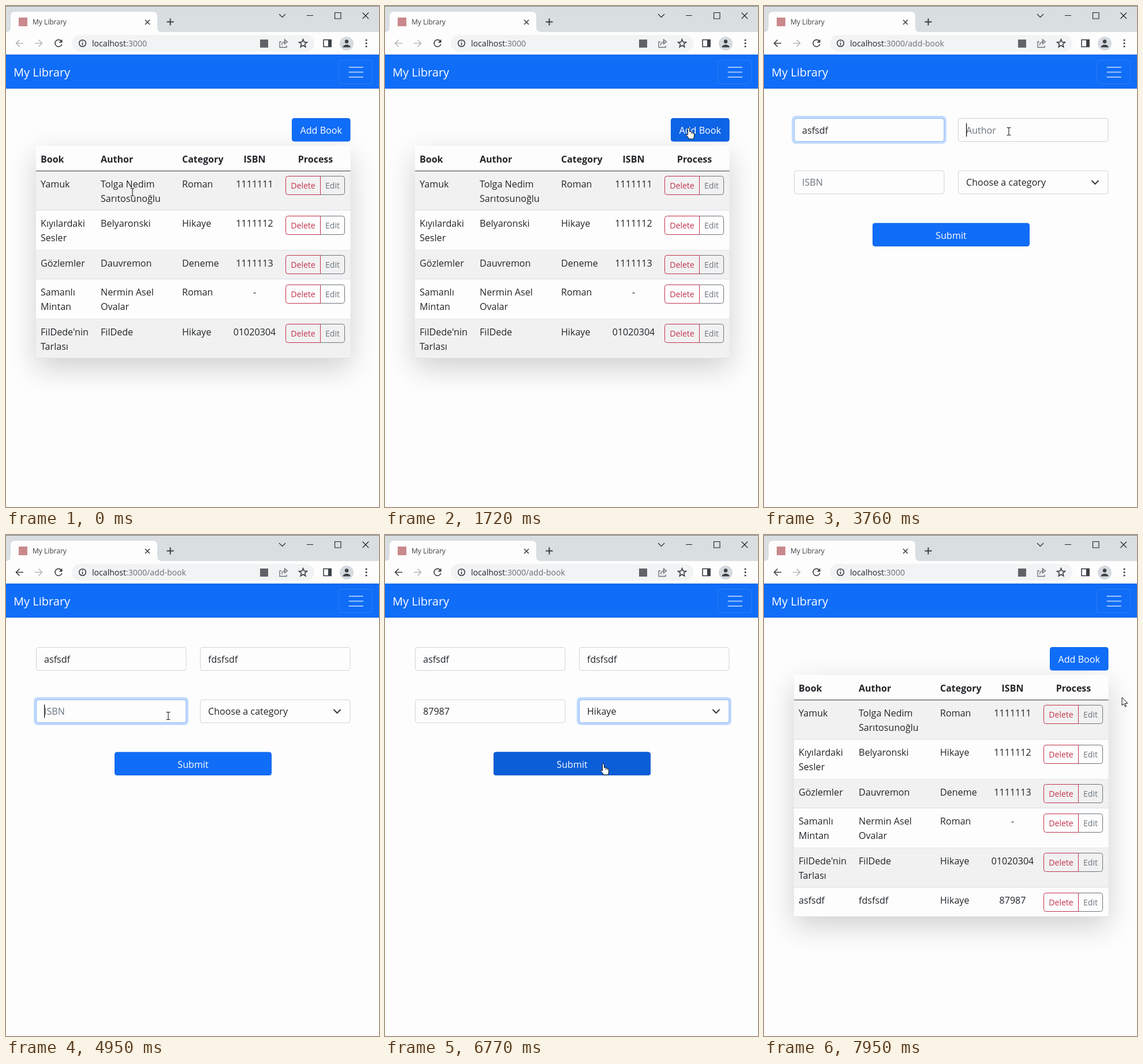
Write an HTML page that moves like this. It is 646 px wide and 867 px high and loops after 7.99 s.

```html
<!DOCTYPE html>
<html lang="en">
<head>
<meta charset="utf-8">
<title>My Library</title>
<style>
  html, body { margin: 0; width: 100%; height: 100%; overflow: hidden; background: #fdfdfd; }
  svg { display: block; }
  text { font: 16.1px "Open Sans", "Noto Sans", sans-serif; fill: #212529; white-space: pre; }
  .bold { font-weight: 700; font-size: 16px; }
  .small { font-size: 14.1px; }
  .tab { font-size: 12px; fill: #3c4043; }
  .brand { font-size: 20px; }
  .mid { text-anchor: middle; }
  .white { fill: #fff; }
  .line { fill: none; stroke: #3c4043; stroke-width: 1.6; }
  .thin { fill: none; stroke: #222; stroke-width: 1.1; }
  .shadow { filter: blur(25px); }
</style>
</head>
<body>
<svg id="stage" width="646" height="867" viewBox="0 0 646 867"></svg>
<script>
const LOOP = 7990;
const BLUE = '#106df7', EDGE_BLUE = '#0d64e6', DARK_BLUE = '#0b5ed7', MUTED = '#6c757d';
const PAGE_FORM = 2060, PAGE_LIST = 6940;
const OPEN = 5860, CHOSEN = 6340;

// Markup helpers
const rect = (x, y, w, h, fill, more = '') =>
  `<rect x="${x}" y="${y}" width="${w}" height="${h}" fill="${fill}" ${more}/>`;
const text = (x, y, s, cls = '', more = '') =>
  `<text x="${x}" y="${y}" class="${cls}" ${more}>${s}</text>`;
const path = (d, cls = 'line', more = '') => `<path d="${d}" class="${cls}" ${more}/>`;
const circle = (x, y, r, more = '') => `<circle cx="${x}" cy="${y}" r="${r}" ${more}/>`;
const button = (id, x, y, w, h, label) =>
  rect(x + .5, y + .5, w - 1, h - 1, BLUE, `rx="3.5" stroke="${EDGE_BLUE}"`) +
  rect(x + .5, y + .5, w - 1, h - 1, DARK_BLUE, `rx="3.5" stroke="#0a58ca" id="${id}" opacity="0"`) +
  text(x + w / 2, y + 27, label, 'mid white');

function star(cx, cy, outer, inner) {
  const points = Array.from({ length: 10 }, (_, i) => {
    const r = i % 2 ? inner : outer, a = i * Math.PI / 5;
    return (cx + r * Math.sin(a)).toFixed(1) + ' ' + (cy - r * Math.cos(a)).toFixed(1);
  });
  return path('M' + points.join('L') + 'Z');
}

function browser() {
  return rect(0, 0, 646, 45, '#d9dee1') + rect(0, 0, 646, 1, '#79868c') +
    path('M0 45Q8 45 8 37V18Q8 10 16 10H254Q262 10 262 18V37Q262 45 270 45Z', '', 'fill="#fdfdfd"') +
    rect(0, 45, 646, 39, '#fdfdfd') +
    rect(22, 20, 15, 15, '#c9898c') +
    text(46, 32, 'My Library', 'tab') +
    path('M241 24l8 8m0-8l-8 8') +
    path('M278.500 27.500h12m-6-6v12', 'line', 'style="stroke-width:2"') +
    path('M473 14l5.500 5.500 5.500-5.500M521 16.500h11M569.500 11.500h10.500v10.500h-10.500zM617.500 11.500l10.500 10.500m0-10.500l-10.500 10.500', 'thin') +
    `<g id="back">${path('M30 64.500H17.500m6-6l-6 6 6 6')}</g>` +
    path('M50 64.500h12.500m-6-6l6 6-6 6', 'line', 'style="stroke:#b4b8bb"') +
    path('M95.500 60.500A6 6 0 1 0 96.700 66') +
    path('M97.500 57.500v6h-6z', '', 'fill="#3c4043"') +
    rect(114, 50, 420, 29, '#f1f3f4', 'rx="14.5"') +
    circle(132.5, 64.5, 5.8, 'class="line"') + path('M132.500 63.500v4.500m0-7.500v1.600') +
    text(149, 70, 'localhost<tspan fill="#6b7075">:3000<tspan id="route"></tspan></tspan>', 'small') +
    rect(440, 58, 14, 14, '#5f6368') +
    path('M477 62h-3v9.500h12v-3M477.500 68c0-4 3-6 7-6m-2-4l5 4-5 4z', 'line', 'style="stroke:#6a6f74;stroke-width:1.300"') +
    star(514.5, 65, 7.3, 3.2) +
    rect(550, 58.5, 13, 12, 'none', 'class="line"') + rect(558, 58, 5.5, 13, '#3c4043') +
    circle(590, 65, 12, 'fill="#d5dae0"') + circle(590, 61.5, 3.2, 'fill="#3c4043"') +
    path('M583.500 71.500c0-6 13-6 13 0z', '', 'fill="#3c4043"') +
    [59, 64.5, 70].map(y => circle(624, y, 1.6, 'fill="#3c4043"')).join('');
}

function navbar() {
  return rect(0, 84, 646, 59, BLUE) +
    rect(0, 84, 646, 1, EDGE_BLUE) + rect(0, 142, 646, 1, EDGE_BLUE) +
    text(13, 122, 'My Library', 'brand white') +
    rect(576.5, 93.5, 58, 41, 'none', 'rx="4" stroke="#fff" stroke-opacity=".1"') +
    [106, 114.5, 123].map(y => rect(593.5, y - 1, 25.5, 2.1, '#fff', 'opacity=".6" rx="1"')).join('');
}

const books = [
  [['Yamuk'], ['Tolga Nedim', 'Sarıtosunoğlu'], 'Roman', '1111111'],
  [['Kıyılardaki', 'Sesler'], ['Belyaronski'], 'Hikaye', '1111112'],
  [['Gözlemler'], ['Dauvremon'], 'Deneme', '1111113'],
  [['Samanlı', 'Mintan'], ['Nermin Asel', 'Ovalar'], 'Roman', '-'],
  [["FilDede'nin", 'Tarlası'], ['FilDede'], 'Hikaye', '01020304'],
  [['asfsdf'], ['fdsfsdf'], 'Hikaye', '87987']
];

function bookRow([title, author, category, isbn], index, top) {
  const tall = Math.max(title.length, author.length) > 1;
  const height = tall ? 68.5 : 50.5;
  const base = Math.round(top + 28), btn = Math.ceil(top + 8.5) + .5;
  const lines = (x, list) => list.map((s, i) => text(x, base + i * 25, s)).join('');
  const html = rect(52, top, 544.5, height, index % 2 ? '#fdfdfd' : '#f1f1f1') +
    rect(52, Math.round(top + height) - 1, 544.5, 1, '#dcddea') +
    lines(60, title) + lines(164, author) + text(305, base, category) +
    text(430.5, base, isbn, 'mid') +
    path(`M544.500 ${btn}h38q4 0 4 4v24q0 4 -4 4h-38z`, '', `fill="none" stroke="${MUTED}"`) +
    path(`M544.500 ${btn}h-56q-4 0 -4 4v24q0 4 4 4h56z`, '', 'fill="none" stroke="#c2334d"') +
    text(514.5, btn + 21.5, 'Delete', 'mid small', 'style="fill:#c2334d"') +
    text(565.5, btn + 21.5, 'Edit', 'mid small', `style="fill:${MUTED}"`);
  return { html, height };
}

function listPage() {
  let top = 285.5;
  const rows = books.map((book, i) => {
    const row = bookRow(book, i, top);
    top += row.height;
    return i === 5 ? `<g id="newBook">${row.html}</g>` : row.html;
  });
  const heads = [[60, 'Book'], [164, 'Author'], [305, 'Category'], [430.5, 'ISBN'], [536, 'Process']];
  return rect(52, 259, 544.5, 368, '#000', 'id="shadow" class="shadow" opacity=".175"') +
    button('addHover', 495, 194, 101.5, 40.5, 'Add Book') +
    rect(52, 242, 544.5, 44, '#fdfdfd') +
    heads.map(([x, s]) => text(x, 271, s, x > 400 ? 'bold mid' : 'bold')).join('') +
    rows.join('') + rect(52, 285, 544.5, 1, '#33373b');
}

// Form fields: position, focus interval, and typed value with its first key time
const fields = [
  { x: 52, y: 194, hint: 'Book Name', value: 'asfsdf', focus: [2860, 3755], typing: 3000 },
  { x: 336, y: 194, hint: 'Author', value: 'fdsfsdf', focus: [3755, 4780], typing: 3980 },
  { x: 52, y: 284.5, hint: 'ISBN', value: '87987', focus: [4780, 5850], typing: 5100 },
  { x: 336, y: 284.5, hint: 'Choose a category', value: 'Hikaye', focus: [5850, 6880], select: true }
];
const options = ['Choose a category', 'Roman', 'Hikaye', 'Deneme'];
const OPTION_H = 22.5, MENU_Y = 326;

function fieldBox({ x, y, select }, i) {
  return `<g id="ring${i}" opacity="0">${rect(x - 4, y - 4, 268, 48.5, '#c2dbfe', 'rx="7"')}</g>` +
    rect(x + .5, y + .5, 259.5, 40, '#fdfdfd', 'rx="4" stroke="#ced4da"') +
    rect(x + .5, y + .5, 259.5, 40, 'none', `rx="4" stroke="#86b7fe" id="edge${i}" opacity="0"`) +
    text(x + 14, Math.round(y + 26.5), '', '', `id="value${i}"`) +
    rect(x + 14, y + 9, 1.3, 23, '#111', `id="caret${i}"`) +
    (select ? path(`M${x + 232} ${y + 18}l5.500 5.500 5.500-5.500`, '', 'fill="none" stroke="#343a40" stroke-width="2" stroke-linecap="round"') : '');
}

function formPage() {
  return fields.map(fieldBox).join('') +
    button('submitHover', 188, 375.5, 272, 40.5, 'Submit') +
    `<g id="menu">${rect(336.5, MENU_Y - .5, 260, 4 * OPTION_H + 1, '#fff', 'stroke="#767676"')}` +
    options.map((s, i) =>
      rect(337, MENU_Y + i * OPTION_H, 259, OPTION_H, '#1967d2', `id="mark${i}"`) +
      text(350, MENU_Y + i * OPTION_H + 17, s, '', `id="option${i}"`)).join('') + '</g>';
}

// Pointer shapes, drawn around their visual centre
const pointers = {
  beam: path('M-3.500 -6.500h2.500l1 1 1-1h2.500M-3.500 6.500h2.500l1-1 1 1h2.500M0 -5.500v11', 'thin'),
  arrow: path('M-4 -8v14l3.200-3 2.300 5.200 2-.9-2.300-5h4.500z', '', 'fill="#fff" stroke="#111"'),
  hand: path('M-3.500 -7.500q0-1.500 1.500-1.500t1.500 1.500v5q3-.8 3 1 2.500-.8 2.500 1 2.500-.5 2.500 1.500v4q0 2-1.500 5h-7.500q-1-3-5-7 0-2.200 3 0z', '', 'fill="#fff" stroke="#111"') +
    path('M2.500 -1.500v3M5 -.5v2.500', '', 'fill="none" stroke="#111" stroke-width=".8"')
};

document.getElementById('stage').innerHTML = rect(0, 0, 646, 867, '#fdfdfd') +
  `<g id="list">${listPage()}</g><g id="form">${formPage()}</g>` + navbar() + browser() +
  '<g id="pointer">' + Object.entries(pointers).map(([k, s]) => `<g id="${k}">${s}</g>`).join('') + '</g>';

const $ = id => document.getElementById(id);
const show = (id, on) => $(id).setAttribute('display', on ? 'inline' : 'none');
const set = (id, name, value) => $(id).setAttribute(name, value);
const clamp = v => Math.min(1, Math.max(0, v));
const fade = (t, from, to) => clamp((t - from) / 150) - clamp((t - to) / 150);

// Pointer stops: time, x, y
const stops = [
  [0, 219, 322], [500, 219, 322], [1680, 528, 220], [2130, 528, 220],
  [2760, 224, 230], [3240, 224, 230], [3700, 424, 217], [4240, 424, 217],
  [4720, 281, 313], [5380, 281, 313], [5800, 452, 308], [5940, 452, 308],
  [6260, 400, 383], [6370, 400, 383], [6680, 380, 405], [7000, 380, 405],
  [7760, 624, 289], [LOOP, 624, 289]
];

function pointerAt(t) {
  const i = stops.findIndex(s => s[0] > t);
  const [t0, x0, y0] = stops[i - 1], [t1, x1, y1] = stops[i];
  const p = (t - t0) / (t1 - t0), e = p * p * (3 - 2 * p);
  return [x0 + (x1 - x0) * e, y0 + (y1 - y0) * e];
}

function pointerShape(x, y, onForm, open) {
  const within = (l, t, r, b) => x > l && x < r && y > t && y < b;
  if (open) return 'arrow';
  if (onForm) {
    if (within(188, 375, 460, 416)) return 'hand';
    return fields.some(f => !f.select && within(f.x, f.y, f.x + 260, f.y + 41)) ? 'beam' : 'arrow';
  }
  if (within(495, 194, 597, 235)) return 'hand';
  const overText = [[60, 143], [164, 280], [305, 377], [394, 467]].some(([l, r]) => within(l, 250, r, 605));
  return overText ? 'beam' : 'arrow';
}

function drawField(field, i, t) {
  const { x, hint, value, focus: [from, to], typing, select } = field;
  const typed = select ? (t >= CHOSEN ? value : '')
    : value.slice(0, Math.max(0, Math.floor((t - typing) / 75)));
  const label = $('value' + i), glow = fade(t, from, to);
  label.textContent = typed || hint;
  label.style.fill = typed || select ? '#212529' : MUTED;
  set('ring' + i, 'opacity', glow);
  set('edge' + i, 'opacity', glow);
  const blinkOn = (t - from) % 1060 < 530;
  show('caret' + i, !select && t >= from && t < to && blinkOn);
  set('caret' + i, 'x', x + 14 + (typed ? label.getComputedTextLength() : 0));
}

function draw(t) {
  const onForm = t >= PAGE_FORM && t < PAGE_LIST, added = t >= PAGE_LIST;
  const open = t >= OPEN && t < CHOSEN;
  const [x, y] = pointerAt(t);
  show('list', !onForm);
  show('form', onForm);
  show('newBook', added);
  set('shadow', 'height', added ? 418 : 368);
  $('route').textContent = onForm ? '/add-book' : '';
  set('back', 'opacity', t < PAGE_FORM ? .38 : 1);
  set('addHover', 'opacity', fade(t, 1640, PAGE_FORM));
  set('submitHover', 'opacity', fade(t, 6590, PAGE_LIST));
  if (onForm) {
    fields.forEach((field, i) => drawField(field, i, t));
    show('menu', open);
    const active = Math.max(0, Math.floor((y - MENU_Y) / OPTION_H));
    options.forEach((_, i) => {
      show('mark' + i, i === active);
      $('option' + i).style.fill = i === active ? '#fff' : '#212529';
    });
  }
  const shape = pointerShape(x, y, onForm, open);
  Object.keys(pointers).forEach(k => show(k, k === shape));
  set('pointer', 'transform', `translate(${x.toFixed(1)} ${y.toFixed(1)})`);
}

const start = performance.now();
function tick() {
  draw((performance.now() - start) % LOOP);
  requestAnimationFrame(tick);
}
tick();
</script>
</body>
</html>
```
